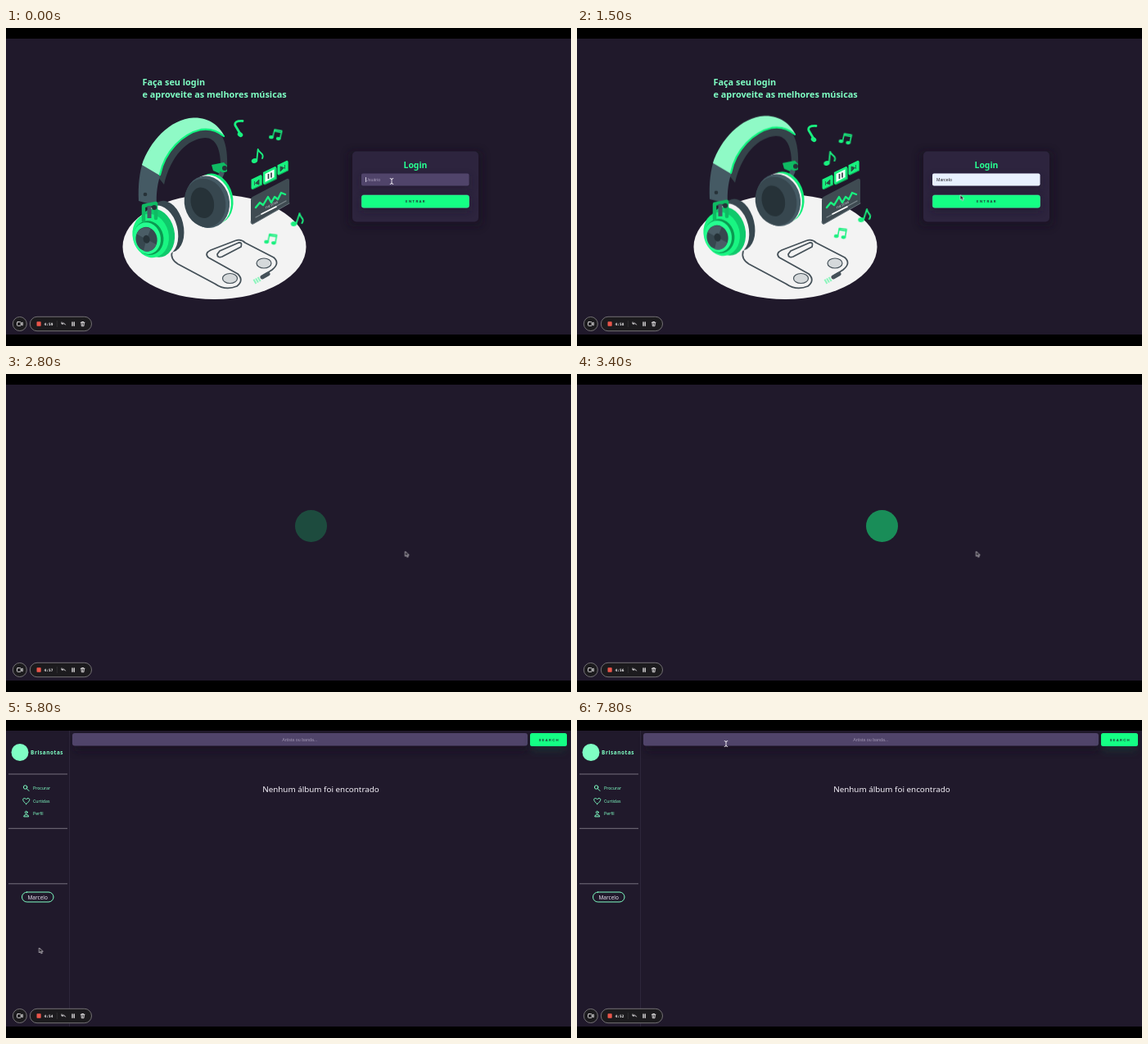
An HTML page for the animation above (8000 ms loop, 690 px wide and 388 px high).

```html
<!DOCTYPE html>
<html lang="pt">
<head>
<meta charset="utf-8">
<title>Login</title>
<style>
  html, body { margin: 0; height: 100%; overflow: hidden; background: #000; }
  svg { display: block; width: 100vw; height: 100vh; }
  text { font-family: "Noto Sans", "Open Sans", sans-serif; }
  .field { font-family: "Liberation Sans", Arial, sans-serif; font-size: 5.3px; }
  .caps { font: 500 4.4px Roboto, sans-serif; letter-spacing: 1.4px; fill: #20192b; }
  .mid { text-anchor: middle; }
  .mint { fill: #7fffc4; }
  .line { fill: none; stroke-linecap: round; stroke-linejoin: round; }

  /* Hard cuts */
  .cut { animation: 8s step-end infinite; }
  .login { animation-name: login; }
  .loading { animation-name: loading; }
  .main { animation-name: main; }
  .empty { animation-name: empty; }
  .caret { animation-name: caret; }
  .filled { animation-name: filled; }
  .dots { animation-name: dots; }
  .user { animation-name: user; }
  .beam { animation-name: beam; }
  .hand { animation-name: hand; }
  .arrow { animation-name: arrow; }
  @keyframes login { 0% { opacity: 1 } 34.8%, 100% { opacity: 0 } }
  @keyframes loading { 0% { opacity: 0 } 34.8% { opacity: 1 } 46%, 100% { opacity: 0 } }
  @keyframes main { 0% { opacity: 0 } 46%, 100% { opacity: 1 } }
  @keyframes empty { 0% { opacity: 1 } 17.5%, 100% { opacity: 0 } }
  @keyframes caret { 0%, 12.5% { opacity: 1 } 6.25%, 17.5%, 100% { opacity: 0 } }
  @keyframes filled { 0% { opacity: 0 } 17.5%, 100% { opacity: 1 } }
  @keyframes dots { 0% { opacity: 1 } 68.6%, 100% { opacity: 0 } }
  @keyframes user { 0% { opacity: 0 } 68.6%, 100% { opacity: 1 } }
  @keyframes beam { 0%, 95%, 100% { opacity: 1 } 15% { opacity: 0 } }
  @keyframes hand { 0%, 34.8%, 100% { opacity: 0 } 23% { opacity: 1 } }
  @keyframes arrow { 0%, 23%, 95%, 100% { opacity: 0 } 15%, 34.8% { opacity: 1 } }

  /* Continuous motion */
  .phones { animation: rise 8s ease-in-out infinite; }
  .drift { animation: drift 8s ease-in-out infinite; }
  .pulse { animation: pulse 8s ease-in-out infinite; }
  .cursor { animation: cursor 8s ease-in-out infinite; }
  .timer { animation: roll 8s steps(8) infinite; }
  @keyframes rise { 0%, 62.5%, 100% { transform: translateY(1px) } 31.25% { transform: translateY(-2.4px) } }
  @keyframes drift { 0%, 38.75%, 100% { transform: none } 19.4% { transform: translate(var(--x), var(--y)) } }
  @keyframes pulse { 0%, 35%, 45%, 100% { opacity: .22 } 40% { opacity: .8 } }
  @keyframes roll { to { transform: translateY(-80px) } }
  @keyframes cursor {
    0% { transform: translate(471px, 187px) }
    11.25% { transform: translate(475px, 194px) }
    17.5% { transform: translate(466px, 203px) }
    22.5% { transform: translate(482px, 208px) }
    27.5%, 31% { transform: translate(491.5px, 214px) }
    35%, 45% { transform: translate(487.5px, 216.5px); animation-timing-function: ease-in }
    52.5% { transform: translate(148.5px, 254px); animation-timing-function: ease-out }
    56.25% { transform: translate(89px, 246px) }
    67.5%, 72.5% { transform: translate(40.5px, 278px) }
    79% { transform: translate(33px, 275px) }
    90% { transform: translate(91px, 82px) }
    97.5%, 100% { transform: translate(182px, 29px) }
  }
</style>
</head>
<body>
<svg viewBox="0 0 690 388">
  <defs>
    <filter id="soft" x="-30%" y="-80%" width="160%" height="300%"><feGaussianBlur stdDeviation="5"/></filter>
    <clipPath id="window"><rect x="44" y="356" width="16" height="10"/></clipPath>
    <g id="eighth">
      <ellipse rx="3.8" ry="2.8" transform="rotate(-20)" fill="#19f07f"/>
      <path d="M2.8-1 4.2-14C6-9 12-9 9.5-3" class="line" stroke="#19f07f" stroke-width="1.9"/>
    </g>
    <g id="pair" fill="#19f07f">
      <ellipse cx="-5" cy="5" rx="3" ry="2.3"/>
      <ellipse cx="4.5" cy="6" rx="3" ry="2.3"/>
      <path d="M-3 5-1.5-5.500 8-4.500 6.700 6M-2-3.500 7.500-2.500" class="line" stroke="#19f07f" stroke-width="1.6"/>
    </g>
    <g id="key">
      <path d="M-6-3 4.500-8Q6-8.500 6-6.500V3L-4.500 8Q-6 8.500-6 6.500Z" fill="#19f07f"/>
      <path d="M6-6.500V3L-4.500 8" class="line" stroke="#0eae5b"/>
    </g>
  </defs>

  <rect y="13" width="690" height="361" fill="#20192b"/>

  <g class="cut login">
    <g class="mint" font-size="10.87" font-weight="700">
      <text x="166.500" y="70">Faça seu login</text>
      <text x="166.500" y="84.500">e aproveite as melhores músicas</text>
    </g>

    <ellipse cx="254.500" cy="267" rx="112" ry="64" fill="#f3f3f3"/>

    <!-- Cable, drawn like a note -->
    <g class="line" stroke="#455159" stroke-width="1.8">
      <path d="M203 272Q200 282 210 288L255 312Q268 321 282 315 291 308 283 300L247 280Q242 275 250 271L280 259.500Q287 257 292 262L327 280Q335 287 325 295L314 302"/>
      <path d="M261 272 284 262Q289 261 287 267L264 279Q258 281 258 276Z"/>
      <ellipse cx="273.500" cy="305.500" rx="9" ry="6" fill="#d5d9db" stroke-width="1.200"/>
      <ellipse cx="315" cy="287" rx="9" ry="6" fill="#d5d9db" stroke-width="1.200"/>
      <path d="M320 300 313 304" stroke-width="5"/>
      <path d="M310 306 303 310" stroke="#8df5bd" stroke-width="6" stroke-dasharray="2 1" stroke-linecap="butt"/>
    </g>

    <!-- Player -->
    <path d="M301 206 343 184Q346 183 346 187V214L302 239Q299 240 299 236V210Q299 207 301 206Z" fill="#3f4b52"/>
    <path d="M299 236Q299 240 302 239L346 214" class="line" stroke="#657279"/>
    <path d="M305 219 310 213 314 216 320 206 324 213 328 206 332 209 336 201 341 203" class="line" stroke="#19f07f" stroke-width="2.400"/>
    <text transform="translate(317 221) rotate(-27) skewX(-20)" font-size="3.500" fill="#dce2e3">THE SONG</text>
    <path d="M305 231 342 211" class="line" stroke="#7b878c" stroke-width="1.300"/>
    <path d="M312 227 330 218" class="line" stroke="#fff" stroke-width="1.600"/>
    <use href="#key" transform="translate(306 188) scale(1.080)"/>
    <use href="#key" transform="translate(338 170.500) scale(1.080)"/>
    <path d="M309 185V191L304.500 189.500ZM303.500 187V192M335 169V175L339.500 170.500ZM340.500 167V172" fill="#285044" stroke="#285044" stroke-width=".8"/>
    <use href="#key" transform="translate(322 180) scale(1.350)"/>
    <path d="M316.500 178 327.500 172.500V182L316.500 188Z" fill="#f4fff9"/>
    <path d="M320.500 178V184M324 176.500V182.500" stroke="#35454b" stroke-width="1.700"/>

    <g class="phones">
      <!-- Band -->
      <path d="M185 180C193 148 214 126 240 120 262 117 272 136 270 172L262 172C263 146 256 133 243 133 222 134 201 155 193 190Z" fill="#35434a"/>
      <path d="M168 160 190 174C185 187 183 201 184 216L162 210C161 191 163 174 168 160Z" fill="#455a64"/>
      <path d="M166 166C175 138 200 110 229 108.500 248 108 260 118 267 131 258 124 248 121 238 123 216 128 194 149 188 179Z" fill="#8ffac6"/>
      <path d="M188 178C194 149 216 128 238 123 251 121 259 125 266 131" class="line" stroke="#12f681" stroke-width="2.300"/>
      <circle cx="170" cy="202" r="2.300" fill="#273238"/>

      <!-- Right cup -->
      <path d="M251 166 266 163 270 167V174L262 177 253 173Z" fill="#0fbb63"/>
      <circle cx="267" cy="170" r="3" fill="#263238"/>
      <path d="M264 175 259 186" stroke="#455a64" stroke-width="6"/>
      <g transform="rotate(-14 247 212)">
        <ellipse cx="255" cy="209" rx="23" ry="31" fill="#12ee7b"/>
        <ellipse cx="250" cy="210" rx="25" ry="31.500" fill="#f4f4f4"/>
        <ellipse cx="246" cy="211" rx="27" ry="32" fill="#455a64"/>
        <ellipse cx="243" cy="211.500" rx="25" ry="30" fill="#37474f"/>
        <ellipse cx="240" cy="210.500" rx="14" ry="19" fill="#263238"/>
      </g>

      <!-- Left cup -->
      <g transform="rotate(-14 182 249)">
        <ellipse cx="198" cy="245" rx="20" ry="32" fill="#37474f"/>
        <ellipse cx="190" cy="248" rx="20" ry="31" fill="#f4f4f4"/>
        <ellipse cx="183.500" cy="249.500" rx="22" ry="30" fill="#0fc96b"/>
        <ellipse cx="176" cy="251" rx="22" ry="27" fill="#19f582"/>
        <ellipse cx="173" cy="253" rx="18" ry="21" fill="#0a9a51"/>
        <ellipse cx="171" cy="253" rx="16.500" ry="19.500" fill="#25ff90"/>
        <ellipse cx="170" cy="254" rx="13" ry="15" fill="#37474f"/>
        <path d="M170 254 160 245A13 15 0 0 1 178 243ZM170 254 180 263A13 15 0 0 1 163 267Z" fill="#4a5d66"/>
        <ellipse cx="170" cy="254" rx="4" ry="5" fill="#263238"/>
      </g>
      <path d="M168 234V216L183 213V231" class="line" stroke="#0fbb63" stroke-width="4.500"/>
      <path d="M175 216V231" stroke="#455a64" stroke-width="5"/>
      <circle cx="181" cy="218" r="3" fill="#263238"/>
    </g>

    <g class="drift" style="--x:3px;--y:6px">
      <path d="M289 113.500Q278 113 280 119L286 129" class="line" stroke="#19f07f" stroke-width="2.800"/>
      <ellipse cx="286" cy="130" rx="3.500" ry="2.700" transform="rotate(35 286 130)" fill="#19f07f"/>
    </g>
    <g class="drift" style="--x:-1.5px;--y:5px"><use href="#pair" transform="translate(329 129) rotate(6) scale(.93)"/></g>
    <g class="drift" style="--x:1.5px;--y:3px"><use href="#eighth" x="303.500" y="162"/></g>
    <g class="drift" style="--x:-4.5px;--y:-5px"><use href="#eighth" transform="translate(351.500 239) rotate(12)"/></g>
    <g class="drift" style="--x:-1.5px;--y:-7px"><use href="#pair" transform="translate(323 256.500) rotate(3) scale(.93)"/></g>

    <!-- Form -->
    <rect x="418" y="150" width="164" height="92" rx="6" fill="#171121" opacity=".55" filter="url(#soft)"/>
    <rect x="423" y="150.500" width="154" height="86" rx="5" fill="#2d243e"/>
    <text x="500" y="171" class="mid" font-size="10.400" font-weight="700" fill="#27ff91">Login</text>
    <rect x="434" y="181" width="132" height="15" rx="2" fill="#1d1629" opacity=".5" filter="url(#soft)"/>
    <rect x="434" y="177.500" width="131.500" height="15" rx="2" fill="#50446a"/>
    <g class="cut empty">
      <text x="439" y="186.700" class="field" fill="#a59ab8">Usuário</text>
      <path d="M439.500 182V188" stroke="#e8e2f2" stroke-width=".8" class="cut caret"/>
    </g>
    <g class="cut filled">
      <rect x="434" y="177.500" width="131.500" height="15" rx="2" fill="#e8f0fe"/>
      <text x="439" y="186.700" class="field" fill="#24232b">Marcelo</text>
    </g>
    <rect x="434" y="208" width="132" height="15" rx="2" fill="#1d1629" opacity=".6" filter="url(#soft)"/>
    <rect x="434.300" y="203.900" width="131.200" height="15.300" rx="2.500" fill="#14ff84" stroke="#4dffa8" stroke-width=".5"/>
    <text x="488" y="213.100" class="caps">ENTRAR</text>
  </g>

  <g class="cut loading">
    <circle cx="372.500" cy="185.500" r="19.500" fill="#14ff84" class="pulse"/>
  </g>

  <g class="cut main">
    <path d="M77.500 13V374" stroke="#2d263b"/>
    <circle cx="17" cy="39.500" r="10.500" class="mint"/>
    <text x="30" y="42" class="mint" font-size="6.400" font-weight="700" letter-spacing=".6">Brisanotas</text>
    <path d="M3 66H75M3 132.300H75M3 199.800H75" stroke="#77717f"/>
    <g class="mint" font-size="5.200" font-weight="500">
      <text x="33" y="85.300">Procurar</text>
      <text x="33" y="100.800">Curtidas</text>
      <text x="33" y="116.200">Perfil</text>
    </g>
    <g class="line" stroke="#7fffc4">
      <circle cx="23.600" cy="82" r="2.200"/>
      <path d="M25.300 83.700 28 86.500M24.700 102.500C19 98 20.500 95.500 22.500 95.500 24 95.500 24.700 97 24.700 97S25.500 95.500 27 95.500C29 95.500 30.500 98 24.700 102.500Z"/>
      <circle cx="24.700" cy="112.700" r="1.400"/>
      <path d="M21.700 117.500Q21.700 115.500 24.700 115.500T27.700 117.500Z"/>
      <rect x="19.500" y="210" width="18" height="10.500" rx="5.200" class="cut dots"/>
      <rect x="19.500" y="210" width="38.500" height="12" rx="6" class="cut user"/>
    </g>
    <text x="28.500" y="217" class="mid cut dots" font-size="6" fill="#ece6f5">...</text>
    <text x="38.700" y="218.600" class="mid cut user" font-size="6.500" fill="#ece6f5">Marcelo</text>

    <rect x="84" y="24" width="552" height="14" rx="3" fill="#151020" opacity=".6" filter="url(#soft)"/>
    <rect x="81" y="16" width="556" height="15.500" rx="3" fill="#50446a"/>
    <text x="358.800" y="25.700" class="field mid" fill="#a095b3">Artista ou banda...</text>
    <rect x="642" y="24" width="41" height="14" rx="3" fill="#173b36" opacity=".6" filter="url(#soft)"/>
    <rect x="640" y="16" width="45" height="16" rx="2.500" fill="#14ff84"/>
    <text x="650.800" y="25.700" class="caps">SEARCH</text>
    <text x="384.500" y="87.800" class="mid" font-size="9.840" fill="#f4f0f8">Nenhum álbum foi encontrado</text>
  </g>

  <!-- Recorder -->
  <g fill="#1c1b1e" stroke="#737074">
    <circle cx="16.800" cy="361" r="8.500"/>
    <rect x="29.300" y="352.300" width="75.200" height="17.400" rx="8.700"/>
    <path d="M62.300 357V365" stroke="#39373b" stroke-width=".7"/>
  </g>
  <rect x="37.500" y="358.200" width="5.200" height="5.600" rx=".8" fill="#ea554a"/>
  <g class="line" stroke="#e6e4e6" stroke-width=".9">
    <rect x="13.500" y="358.700" width="4.800" height="4.600" rx=".8"/>
    <path d="M18.500 360.500 20.300 359.300V362.700L18.500 361.500M68 359V361H70M68.200 360.800Q70.500 358.500 72.500 362"/>
    <path d="M81 359V363.300M83.200 359V363.300" stroke-width="1.300"/>
    <path d="M91.300 359.300H96M92.800 358.500H94.500M92 359.500 92.300 363.700H95L95.400 359.500M93.700 360.700V362.500"/>
  </g>
  <g clip-path="url(#window)">
    <g class="timer" font-size="4.500" font-weight="700" fill="#f4f2f4" id="timer"></g>
  </g>

  <g class="cursor">
    <path d="M-1.800-3.500Q0-3.500 0-2 0-3.500 1.800-3.500M0-2.500V2.500M-1.800 3.500Q0 3.500 0 2 0 3.500 1.800 3.500" class="line cut beam" stroke="#f2eff5" stroke-width=".9"/>
    <path d="M0 0Q1-.5 1.300.5V2.500L4 3.200Q4.700 3.500 4.400 4.500L3.800 6.500H.3L-1.700 4Q-1.500 3 0 4Z" class="cut hand" fill="#fff" stroke="#302b38" stroke-width=".6"/>
    <path d="M0 0V6L1.500 4.700 2.500 7 3.700 6.500 2.700 4.300H4.600Z" class="cut arrow" fill="#17131d" stroke="#eeebf0" stroke-width=".7"/>
  </g>
</svg>
<script>
  // One row per second, rolled past the clip window by CSS.
  const timer = document.getElementById("timer");
  for (let i = 0; i < 8; i++) {
    const row = document.createElementNS(timer.namespaceURI, "text");
    row.setAttribute("x", 46.5);
    row.setAttribute("y", 362.7 + i * 10);
    row.style.fontFamily = '"DejaVu Sans Mono", monospace';
    row.textContent = `4:${59 - i}`;
    timer.append(row);
  }
</script>
</body>
</html>
```
